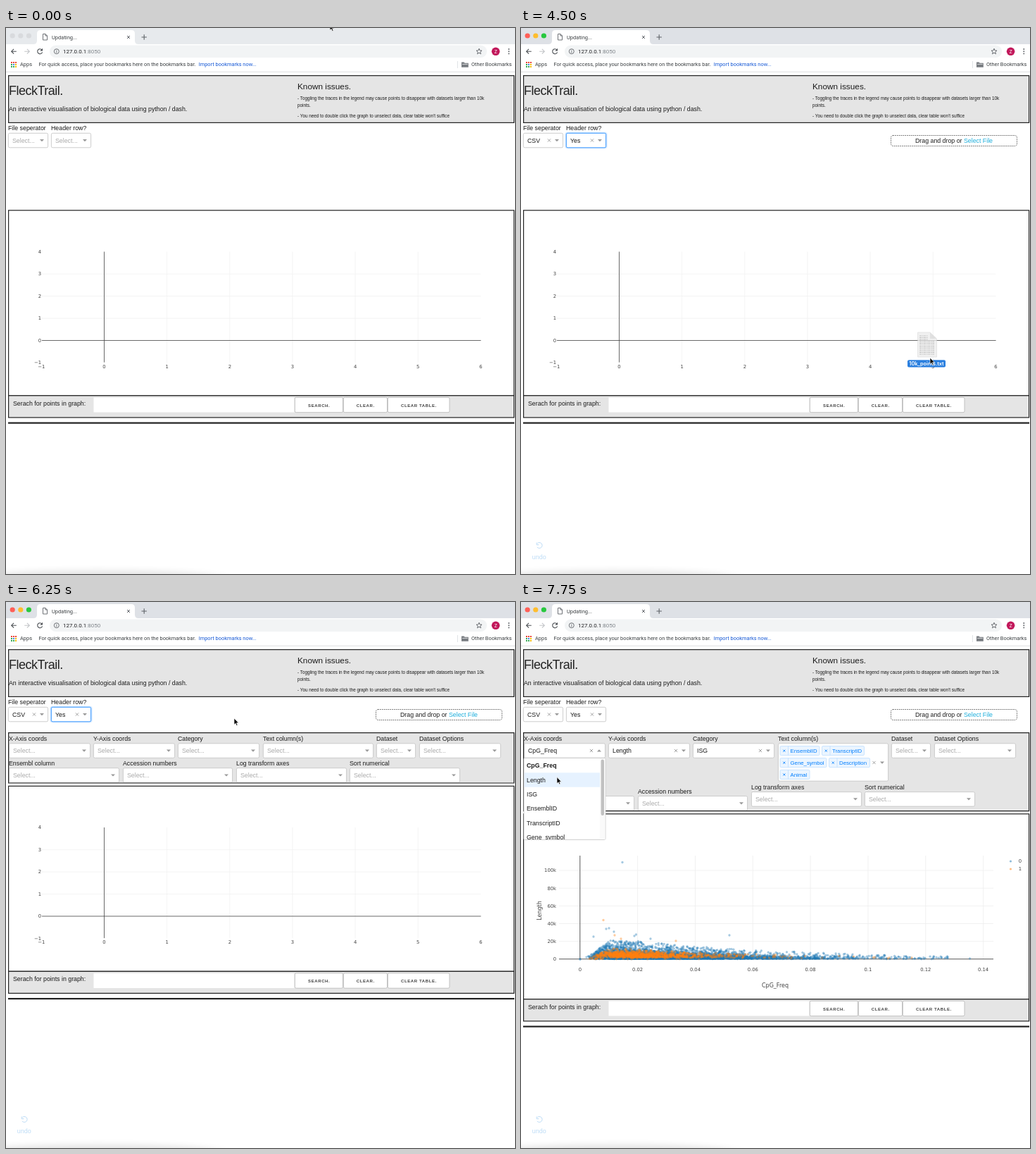
These frames come from a looping animation (723 px wide and 775 px high, 8000 ms). An HTML page with a canvas:

```html
<!DOCTYPE html>
<html lang="en">
<head>
<meta charset="utf-8">
<title>Scatter plot demo</title>
<style>
  html, body { margin: 0; width: 100%; height: 100%; overflow: hidden; background: #fff; }
  svg, canvas { position: absolute; left: 0; top: 0; display: block; }
  #stage, canvas { width: 723px; height: 775px; }
  text { font: 8.8px "Liberation Sans", Arial, sans-serif; fill: #1b1b1b; white-space: pre; }
  text.ui { font: 7.42px Roboto, sans-serif; fill: #3c4043; }
  text.tick { font: 6.8px "DejaVu Sans", Verdana, sans-serif; fill: #444; }
  text.axis { font: 8px "DejaVu Sans", Verdana, sans-serif; fill: #444; }
  text.btn { font-size: 6.05px; font-weight: 600; letter-spacing: .58px; fill: #444; }
  text.note { font-size: 6.33px; }
  text.hint { fill: #aaa; }
  text.tag { font-size: 7.8px; fill: #007eff; }
  text.file { font: 600 7.3px Inter, sans-serif; fill: #fff; }
</style>
</head>
<body>
<svg id="stage" viewBox="0 0 723 775" xmlns="http://www.w3.org/2000/svg"></svg>
<canvas id="dots"></canvas>
<script>
const STEP = 250, STEPS = 32;

// Steps at which the interface changes
const FOCUS = 2, FILE_OPEN = 6, FILE_SET = 8, HEAD_OPEN = 11, HEAD_SET = 13,
      DRAG = 16, DROP = 23, PANEL = 24, FILLED = 27, X_OPEN = 30, X_HOVER = 31;

// step, x, y of the pointer tip
const POINTER = [
  [0, 460, -6], [2, 330, 100], [5, 34, 158], [6, 34, 159], [7, 30, 177], [8, 30, 178],
  [10, 90, 158], [11, 90, 160], [12, 91, 183.5], [13, 91, 184], [15, 520, 770], [16, 570, 758],
  [18, 581, 468], [20, 586, 260], [21, 586, 190], [22, 586, 170], [23, 586, 170],
  [25, 324, 165], [27, 76, 204], [28, 72, 205], [30, 72, 205], [31, 51, 248.5]
];

const text = (x, y, s, cls = '', more = '') => `<text x="${x}" y="${y}" class="${cls}" ${more}>${s}</text>`;
const rect = (x, y, w, h, fill, more = '') =>
  `<rect x="${x}" y="${y}" width="${w}" height="${h}" fill="${fill}" ${more}/>`;
const path = (d, stroke, w = 1, more = '') =>
  `<path d="${d}" fill="none" stroke="${stroke}" stroke-width="${w}" ${more}/>`;
const dot = (x, y, r, fill, more = '') => `<circle cx="${x}" cy="${y}" r="${r}" fill="${fill}" ${more}/>`;
const during = (from, to, body) => `<g data-from="${from}" data-to="${to}">${body}</g>`;
const box = (x, y, w, h, fill) => rect(x, y, w, h, fill, 'stroke="#222" stroke-width="1.2"');
const cross = (x, y, r, color, w) =>
  path(`M${x - r} ${y - r}l${2 * r} ${2 * r}m0 ${-2 * r}l${-2 * r} ${2 * r}`, color, w);
const caret = (x, y, up) =>
  `<path d="M${x - 3} ${up ? y + 1.5 : y - 1.5}h6l-3 ${up ? -3.2 : 3.2}z" fill="#999"/>`;

function select(x, y, right, value, { open = false, focus = false, h = 20.5 } = {}) {
  const w = right - x, mid = y + 10.2;
  return (focus ? rect(x - .8, y - .8, w + 1.6, h + 1.6, 'none', 'rx="3" stroke="#007eff" stroke-opacity=".2" stroke-width="1.5"') : '') +
    rect(x + .4, y, w - .8, h, '#fff', `rx="2" stroke="${focus ? '#2a90ff' : '#c8c8c8'}" stroke-width=".9"`) +
    text(x + 6, y + 13.4, value || 'Select...', value ? '' : 'hint') +
    (value ? cross(right - 20, mid, 2.1, '#999', .9) : '') + caret(right - 9, mid, open);
}

function menu(x, y, w, h, items, { hover = -1, bold = -1, rowW = w } = {}) {
  const rows = items.map((s, i) =>
    (i === hover ? rect(0, i * 20.4, rowW, 20.4, '#e6f2ff') : '') +
    text(3.5, i * 20.4 + 13.4, s, '', i === bold ? 'style="font-weight:700"' : '')).join('');
  return rect(x, y, w, h, '#fff', 'rx="1.5" stroke="#c8c8c8" stroke-width=".9"') +
    `<svg x="${x + .5}" y="${y + .5}" width="${w - 1}" height="${h - 1}">${rows}</svg>`;
}

function chrome() {
  const lights = colors => colors.map((c, i) => dot(9.2 + i * 11.6, 11, 3.6, c)).join('');
  const apps = ['#ea4335', '#ea4335', '#ea4335', '#34a853', '#4285f4', '#fbbc04', '#34a853', '#34a853', '#fbbc04']
    .map((c, i) => rect(7 + i % 3 * 3, 48 + (i / 3 | 0) * 3, 2, 2, c)).join('');
  const star = [...Array(10)].map((_, i) => {
    const r = i % 2 ? 1.8 : 4.2, a = (i / 5 - .5) * Math.PI;
    return `${(672 + r * Math.cos(a)).toFixed(1)},${(33.4 + r * Math.sin(a)).toFixed(1)}`;
  }).join(' ');
  return during(0, FOCUS, rect(0, 0, 723, 23, '#e7eaed') + lights(['#d8dadd', '#d8dadd', '#d8dadd'])) +
    during(FOCUS, STEPS, rect(0, 0, 723, 23, '#dee1e6') + lights(['#ff5f57', '#ffbd2e', '#28c83f'])) +
    '<path d="M39 23q5 0 5-5V8q0-5 5-5H178q5 0 5 5v10q0 5 5 5z" fill="#fff"/>' +
    path('M52.5 8.5h3.5l2.5 2.5v6h-6zM56 8.5v2.5h2.5', '#5f6368', .9) +
    text(65, 15.6, 'Updating...', 'ui', 'style="font-size:7.5px"') +
    cross(174, 13, 2, '#5f6368', 1) + path('M192.5 13h7.4m-3.7-3.7v7.4', '#5f6368', 1.1) +
    path('M14.8 33.2h-7m3.3-3.4l-3.4 3.4l3.4 3.4', '#4b4f53', 1.1) +
    path('M26.2 33.2h7m-3.3-3.4l3.4 3.4l-3.4 3.4', '#c3c5c8', 1.1) +
    path('M51 31a3.5 3.5 0 1 0 .6 3.3', '#4b4f53', 1.1) + '<path d="M52 28.8v3.6h-3.6z" fill="#4b4f53"/>' +
    rect(62, 24.5, 621, 17.5, '#f2f4f5', 'rx="8.7"') +
    dot(71.8, 33.2, 3.5, 'none', 'stroke="#5f6368" stroke-width=".9"') + path('M71.8 32.7v2.5m0-4.2v.9', '#5f6368', .9) +
    text(81, 36, '<tspan>127.0.0.1</tspan><tspan fill="#80868b">:8050</tspan>', 'ui', 'style="font-size:8px;fill:#202124"') +
    `<polygon points="${star}" fill="none" stroke="#5f6368" stroke-width=".9"/>` +
    dot(695.6, 33.3, 5.8, '#c2185b') + text(695.6, 35.6, 'Z', 'ui', 'text-anchor="middle" style="font-size:6.5px;fill:#fff"') +
    [30, 33.2, 36.4].map(y => dot(714.3, y, .95, '#5f6368')).join('') +
    apps + text(20, 54.4, 'Apps', 'ui') +
    text(46.5, 54.4, 'For quick access, place your bookmarks here on the bookmarks bar.', 'ui') +
    text(273.7, 54.4, 'Import bookmarks now...', 'ui', 'style="fill:#1558d6"') +
    path('M641.5 47v10', '#dadce0', .8) +
    '<path d="M647 48.5h3.6l1 1.2h5.2v6h-9.8z" fill="#777b80"/>' + path('M648 51.4h7.8', '#fff', .7) +
    text(661, 54.4, 'Other Bookmarks', 'ui') + path('M0 62.3h723', '#d5d7da', .8);
}

function heading() {
  return box(3.6, 67.6, 718, 66.8, '#e5e5e5') +
    text(4, 95, 'FleckTrail.', '', 'style="font-size:18px;letter-spacing:-.5px;fill:#222"') +
    text(4, 118, 'An interactive visualisation of biological data using python / dash.') +
    text(414, 86.5, 'Known issues.', '', 'style="font-size:11.8px"') +
    text(414, 102.4, '- Toggling the traces in the legend may cause points to disappear with datasets larger than 10k', 'note') +
    text(414, 112.3, 'points.', 'note') +
    text(414, 127.2, "- You need to double click the graph to unselect data, clear table won't suffice", 'note');
}

function fileControls() {
  const file = (value, opt) => select(3, 149.3, 60, value, opt);
  const head = (value, opt) => select(64, 149.3, 121, value, opt);
  return text(3, 145.2, 'File seperator') + text(64, 145.2, 'Header row?') +
    during(0, FILE_OPEN, file()) + during(FILE_OPEN, FILE_SET, file('', { open: true })) +
    during(FILE_SET, HEAD_OPEN, file('CSV', { focus: true })) + during(HEAD_OPEN, STEPS, file('CSV')) +
    during(0, HEAD_OPEN, head()) + during(HEAD_OPEN, HEAD_SET, head('', { open: true })) +
    during(HEAD_SET, X_OPEN, head('Yes', { focus: true })) + during(X_OPEN, STEPS, head('Yes')) +
    during(FILE_OPEN, FILE_SET, menu(3.4, 170, 56.8, 41, ['CSV', 'TSV'], { hover: 0 })) +
    during(HEAD_OPEN, HEAD_SET, menu(64.4, 170, 57, 41, ['Yes', 'No'], { hover: 0 })) +
    during(HEAD_SET, STEPS,
      rect(525.5, 152.5, 179, 15, '#fff', 'rx="3" stroke="#333" stroke-width=".7" stroke-dasharray="1.7 1.1"') +
      text(615, 163.2, 'Drag and drop or <tspan fill="#1eaedb">Select File</tspan>', '', 'text-anchor="middle"'));
}

function tag(x, y, right, label) {
  return rect(x, y, right - x, 13, '#ebf5ff', 'rx="1.5" stroke="#bfdfff" stroke-width=".8"') +
    path(`M${x + 11.5} ${y}v13`, '#bfdfff', .8) + cross(x + 5.8, y + 6.6, 1.5, '#007eff', .9) +
    text(x + 14.5, y + 9.4, label, 'tag');
}

function panel() {
  const cols = [[4, 120, 'X-Axis coords', 'CpG_Freq'], [124, 240, 'Y-Axis coords', 'Length'],
    [244, 360, 'Category', 'ISG'], [365, 522, 'Text column(s)'], [526, 582, 'Dataset'], [587, 703, 'Dataset Options']];
  const lower = [[4, 161, 'Ensembl column'], [166, 322, 'Accession numbers'],
    [327, 484, 'Log transform axes'], [488, 645, 'Sort numerical']];
  const lowerRow = ys => lower.map(([x, r, label], i) => text(x, ys[i] - 4, label) + select(x, ys[i], r)).join('');
  const labels = cols.map(([x, , label]) => text(x, 196.6, label)).join('');
  const frame = bottom => path(`M3.6 185.6H721.6V${bottom}H3.6z`, '#222', 1.2);
  const tags = rect(365.4, 200.8, 156.2, 53.4, '#fff', 'rx="2" stroke="#c8c8c8" stroke-width=".9"') +
    tag(368, 204.6, 424, 'EnsemblID') + tag(427.5, 204.6, 487.5, 'TranscriptID') +
    tag(368, 221.6, 434, 'Gene_symbol') + tag(437.5, 221.6, 495.5, 'Description') +
    tag(368, 238.4, 410, 'Animal') + cross(501.5, 228, 2.1, '#999', .9) + caret(513, 228);
  return during(PANEL, FILLED, rect(3.6, 185.6, 718, 71.4, '#e5e5e5') + labels +
      cols.map(([x, r]) => select(x, 200.8, r)).join('') + lowerRow([235.7, 235.7, 235.7, 235.7]) + frame(257)) +
    during(FILLED, STEPS, rect(3.6, 185.6, 718, 111, '#e5e5e5') + labels +
      cols.map(([x, r, , v], i) => i === 3 ? tags : select(x, 200.8, r, v)).join('') +
      lowerRow([275.5, 275.5, 269.6, 269.6]) + frame(296.6));
}

function xMenu() {
  const items = ['CpG_Freq', 'Length', 'ISG', 'EnsemblID', 'TranscriptID', 'Gene_symbol'];
  const list = hover => menu(4, 221.4, 116, 116, items, { hover, bold: 0, rowW: 108 });
  return during(X_OPEN, X_HOVER, list(0)) + during(X_HOVER, STEPS, list(1)) +
    during(X_OPEN, STEPS, rect(112, 222, 7.5, 115, '#fafafa') + rect(113.6, 223.5, 4.4, 79.5, '#c1c1c1', 'rx="2.2"') +
      rect(107, 208, 8, 6, '#fff') + caret(111, 211, true));
}

function emptyPlot() {
  const x = n => 139.5 + n * 89.15, y = n => 443.5 - n * 31.45;
  let out = '';
  for (let n = 1; n < 6; n++) out += path(`M${x(n)} 317.5V474.6`, '#f0f0f0', .7);
  for (let n = 1; n < 4; n++) out += path(`M51 ${y(n)}H674.5`, '#f0f0f0', .7);
  out += path('M139.5 317.5V474.6M51 443.5H674.6', '#444', .8);
  for (let n = -1; n < 7; n++) out += text(x(n), 482.5, n < 0 ? '−1' : n, 'tick', 'text-anchor="middle"');
  for (let n = -1; n < 5; n++) out += text(50, y(n) + 2.2, n < 0 ? '−1' : n, 'tick', 'text-anchor="end"');
  return out;
}

function dataPlot() {
  const x = n => 83.8 + n * 81.83, y = n => 464.8 - n * 25.15;
  let out = '';
  for (let n = 1; n < 8; n++) out += path(`M${x(n)} 318V465`, '#eee', .8);
  for (let n = 1; n < 6; n++) out += path(`M54 ${y(n)}H671`, '#eee', .8);
  out += path('M83.8 318V465M54 464.8H671', '#444', .9);
  for (let n = 0; n < 8; n++) out += text(x(n), 482.4, +(n * .02).toFixed(2), 'tick', 'text-anchor="middle"');
  for (let n = 0; n < 6; n++) out += text(50, y(n) + 2.4, n ? n * 20 + 'k' : 0, 'tick', 'text-anchor="end"');
  return out + text(361, 505, 'CpG_Freq', 'axis', 'text-anchor="middle"') +
    text(0, 0, 'Length', 'axis', 'text-anchor="middle" transform="translate(28.5 396) rotate(-90)"') +
    dot(695.5, 326, 1.6, '#1f77b4', 'opacity=".5"') + text(706.8, 328.4, '0', 'tick') +
    dot(695.5, 337, 1.6, '#ff7f0e', 'opacity=".5"') + text(706.8, 339.4, '1', 'tick');
}

function graph() {
  const button = (x, right, label) => rect(x, 524.3, right - x, 21.4, '#fff', 'rx="2" stroke="#bbb" stroke-width=".9"') +
    text((x + right) / 2 + .3, 537.7, label, 'btn', 'text-anchor="middle"');
  return '<g id="graph">' + box(3.6, 258.8, 718, 263, '#fff') +
    during(0, FILLED, emptyPlot()) + during(FILLED, STEPS, dataPlot()) +
    box(3.6, 521.8, 718, 31.1, '#e5e5e5') + text(10, 535.5, 'Serach for points in graph:') +
    rect(124.5, 524.5, 285, 21, '#fff') +
    button(410.3, 478.5, 'SEARCH.') + button(479.3, 541.5, 'CLEAR.') + button(542.3, 630, 'CLEAR TABLE.') +
    rect(3, 559.5, 719, 2.2, '#222') + '</g>';
}

function draggedFile() {
  const lines = [...Array(11)].map((_, i) => `M-15 ${-31 + i * 2.6}h${i < 3 ? 12 : 21}`).join('');
  return '<g id="file"><g opacity=".78">' +
    '<path d="M-17.5 -36H0L9.5 -27V-1H-17.5z" fill="#ececec" stroke="#d0d0d0" stroke-width=".6"/>' +
    path(lines, '#b4b4b4', 1.1, 'stroke-dasharray="3 .8 1.6 .7"') +
    '<path d="M0 -36V-27H9.5z" fill="#d8d8d8"/></g>' +
    rect(-32, 3.2, 54, 10.4, '#2a7fdf', 'rx="2"') + text(-5, 11, '10k_points.txt', 'file', 'text-anchor="middle"') + '</g>';
}

const stage = document.getElementById('stage');
stage.innerHTML =
  '<defs><filter id="soft" x="-20%" y="-200%" width="140%" height="500%"><feGaussianBlur stdDeviation="14 5"/></filter></defs>' +
  '<ellipse cx="130" cy="781" rx="175" ry="11" fill="#000" opacity=".1" filter="url(#soft)"/>' +
  chrome() + heading() + graph() + panel() + fileControls() + xMenu() +
  during(FILE_SET, STEPS, path('M23.2 731.6a4 4 0 1 1 -.3 5.2M22.2 730.4v3.2h3.2', '#bddcf6', 1) +
    text(25.8, 754, 'undo', '', 'text-anchor="middle" style="font-size:9px;fill:#bddcf6"')) +
  during(DRAG, DROP, draggedFile()) +
  '<path id="pointer" d="M0 0V9.2L2.1 7.3L3.5 10.5L5 9.8L3.6 6.7H6.4z" fill="#000" stroke="#fff" stroke-width=".7"/>';

// Scatter points: log-normal clouds under a falling ceiling, plus a few strays
const dots = document.getElementById('dots');
function drawDots() {
  const dpr = window.devicePixelRatio || 1, c = dots.getContext('2d');
  dots.width = 723 * dpr;
  dots.height = 775 * dpr;
  c.scale(dpr, dpr);
  c.globalAlpha = .4;
  let seed = 7;
  const rnd = () => (seed = seed * 16807 % 2147483647) / 2147483647;
  const gauss = () => Math.sqrt(-2 * Math.log(rnd())) * Math.cos(2 * Math.PI * rnd());
  const put = (x, y) => { c.beginPath(); c.arc(x, y, 1.65, 0, 7); c.fill(); };
  const cloud = (count, mid, spread, len, lenSpread, roof) => {
    for (let i = 0; i < count; i++) {
      const f = mid * Math.exp(spread * gauss());
      const top = roof * Math.exp(-Math.max(0, f - .015) / .06) * Math.min(1, (f / .01) ** 1.5);
      const k = len * (.03 / f) ** .25 * Math.exp(lenSpread * gauss());
      if (f > .002 && f < .128) put(83.8 + f * 4091, 506.8 - 1.257 * (k < top ? k : top * rnd() ** 1.5));
    }
  };
  c.fillStyle = '#1f77b4';
  cloud(6000, .025, .68, 2.3, .98, 22);
  [[84, 507], [84, 507], [144, 369.5], [296, 473], [103, 475], [121, 464], [125, 463], [161, 474], [163.5, 472],
   [132, 468], [184, 478], [606, 505], [597, 505], [637.5, 506]].forEach(p => put(...p));
  c.fillStyle = '#ff7f0e';
  cloud(1150, .021, .53, 4, .45, 12);
  [[117, 451.5], [133, 473], [220, 481], [142, 478], [555, 505], [523, 505]].forEach(p => put(...p));
}
drawDots();

const timed = [...stage.querySelectorAll('[data-from]')];
const place = (id, x, y) => document.getElementById(id).setAttribute('transform', `translate(${x} ${y})`);

function pointerAt(step) {
  const i = Math.max(1, POINTER.findIndex(k => k[0] >= step));
  const [a, ax, ay] = POINTER[i - 1], [b, bx, by] = POINTER[i], u = (step - a) / (b - a);
  return [ax + (bx - ax) * u, ay + (by - ay) * u];
}

function show(step) {
  for (const g of timed) g.style.display = step >= g.dataset.from && step < g.dataset.to ? '' : 'none';
  dots.style.display = step >= FILLED ? '' : 'none';
  place('graph', 0, step < PANEL ? 0 : step < FILLED ? 2.5 : 42);
  const [x, y] = pointerAt(step);
  place('pointer', x, y);
  place('file', x, y);
}

let start, last = -1;
function tick(now) {
  start ??= now;
  const step = Math.floor((now - start) / STEP) % STEPS;
  if (step !== last) show(last = step);
  requestAnimationFrame(tick);
}
show(0);
requestAnimationFrame(tick);
</script>
</body>
</html>
```
